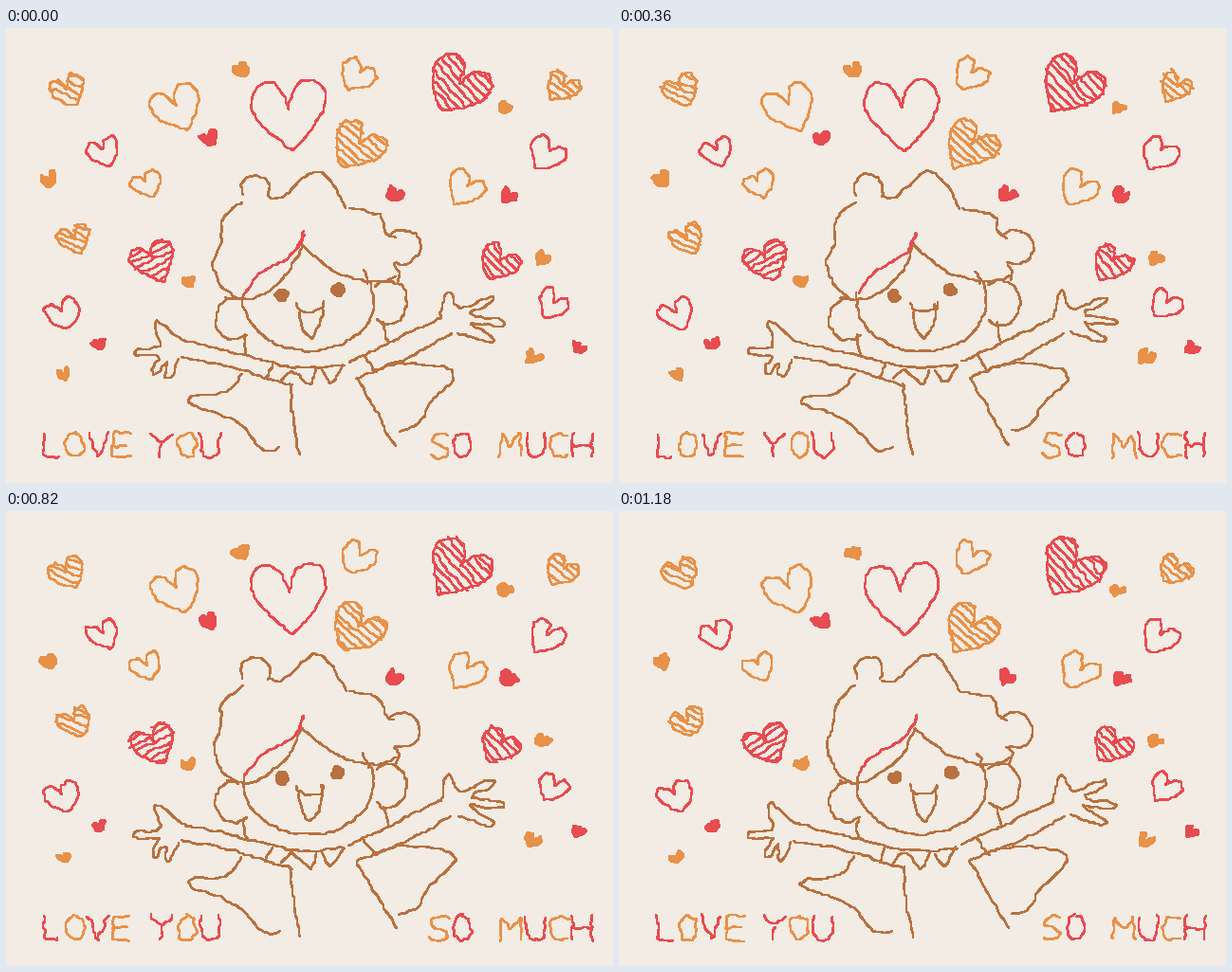
An HTML page for the animation above (1200 ms loop, 640 by 480 pixels).

```html
<!DOCTYPE html>
<html lang="en">
<head>
<meta charset="utf-8">
<title>Love you so much</title>
<style>
  html, body { margin: 0; width: 100%; height: 100%; overflow: hidden; background: #f3ece4; }
  svg { display: block; width: 640px; height: 480px; }
  path { fill: none; stroke-width: 2.9; stroke-linecap: round; stroke-linejoin: round; }
</style>
</head>
<body>
<svg id="art" viewBox="0 0 640 480" shape-rendering="crispEdges" role="img" aria-label="LOVE YOU SO MUCH"></svg>
<script>
const STEP = 20, LOOP = 1200;
const BROWN = '#b8713f', RED = '#e84b50', ORANGE = '#e89148';
const art = document.getElementById('art');
const strokes = [];

const parse = s => s.trim().split(/\s+/).map(p => p.split(',').map(Number));
const mix = (a, b, t) => [a[0] + (b[0] - a[0]) * t, a[1] + (b[1] - a[1]) * t];
const rad = deg => deg * Math.PI / 180;
const clamp = (v, lo, hi) => Math.max(lo, Math.min(hi, v));

function turn([x, y], deg) {
  const c = Math.cos(rad(deg)), s = Math.sin(rad(deg));
  return [x * c - y * s, x * s + y * c];
}

function random(seed) {
  return () => {
    seed = (seed + 0x6D2B79F5) | 0;
    let t = Math.imul(seed ^ (seed >>> 15), 1 | seed);
    t = (t + Math.imul(t ^ (t >>> 7), 61 | t)) ^ t;
    return ((t ^ (t >>> 14)) >>> 0) / 4294967296;
  };
}

// Catmull-Rom curve through the points, as a dense polyline
function smooth(pts, closed) {
  const n = pts.length, out = [];
  const at = i => closed ? pts[(i + n) % n] : pts[clamp(i, 0, n - 1)];
  for (let i = 0; i < (closed ? n : n - 1); i++) {
    const [a, b, c, d] = [at(i - 1), at(i), at(i + 1), at(i + 2)];
    for (let t = 0; t < 1; t += 0.125) {
      out.push([0, 1].map(j => b[j] + t / 2 * (c[j] - a[j] +
        t * (2 * a[j] - 5 * b[j] + 4 * c[j] - d[j] + t * (3 * b[j] - a[j] - 3 * c[j] + d[j])))));
    }
  }
  out.push(at(closed ? 0 : n - 1));
  return out;
}

function measure(pts) {
  const len = [0];
  for (let i = 1; i < pts.length; i++)
    len.push(len[i - 1] + Math.hypot(pts[i][0] - pts[i - 1][0], pts[i][1] - pts[i - 1][1]));
  return len;
}

function pointAt({ pts, len }, d) {
  let i = 1;
  while (i < len.length - 1 && len[i] < d) i++;
  return mix(pts[i - 1], pts[i], (d - len[i - 1]) / (len[i] - len[i - 1] || 1));
}

function add(pts, color, { step = 10, amp = 1.2, grain = 1.1, fill = false, closed = false } = {}) {
  const el = document.createElementNS('http://www.w3.org/2000/svg', 'path');
  el.style.stroke = color;
  if (fill) el.style.fill = color;
  art.appendChild(el);
  strokes.push({ el, pts, len: measure(pts), step, amp, grain, closed });
}

const line = (s, color = BROWN, opt) => add(smooth(parse(s)), color, opt);

function arc(x, y, rx, ry, from, to, opt) {
  const pts = Array.from({ length: 33 }, (_, i) => {
    const a = rad(from + (to - from) * i / 32);
    return [x + rx * Math.cos(a), y + ry * Math.sin(a)];
  });
  add(pts, BROWN, opt);
}

// Sample the stroke at uneven distances, then shake it finely
function rough(s, rnd) {
  const shake = (p, a) => p.map(v => v + (rnd() * 2 - 1) * a);
  const total = s.len[s.len.length - 1], knots = [];
  for (let d = s.closed ? rnd() * 3 : 0; d < total - s.step * 0.4; d += s.step * (0.7 + rnd() * 0.6))
    knots.push(shake(pointAt(s, d), s.amp));
  knots.push(s.closed ? knots[0] : shake(pointAt(s, total), s.amp));
  const out = [];
  knots.forEach((b, i) => {
    if (i) {
      const a = knots[i - 1];
      const n = Math.round(Math.hypot(b[0] - a[0], b[1] - a[1]) / 3.5);
      for (let k = 1; k < n; k++) out.push(shake(mix(a, b, k / n), s.grain));
    }
    out.push(b);
  });
  return 'M' + out.map(p => p.map(Math.round).join(' ')).join('L') + (s.closed ? 'Z' : '');
}

// Hearts lean outwards from the middle and fit a box around x, y
const HALF = parse('.06,-.3 .2,-.46 .42,-.42 .5,-.15 .35,.14 .12,.38');
function heartShape(x, y, w, h, notch) {
  const lean = clamp((x - 305) * 0.6, -24, 34);
  const mirror = HALF.map(([a, b]) => [-a, b]).reverse();
  const pts = smooth([[0, notch], [0, notch], ...HALF, [0, 0.5], [0, 0.5], ...mirror], true).map(p => turn(p, lean));
  const range = j => [Math.min(...pts.map(p => p[j])), Math.max(...pts.map(p => p[j]))];
  const [l, r] = range(0), [t, b] = range(1);
  return pts.map(p => [x + ((p[0] - l) / (r - l) - 0.5) * w, y + ((p[1] - t) / (b - t) - 0.5) * h]);
}

function hatch(shape, color, deg) {
  const pts = shape.map(p => turn(p, -deg));
  const ys = pts.map(p => p[1]), bottom = Math.max(...ys);
  for (let y = Math.min(...ys) + 5; y < bottom - 2; y += 7) {
    const xs = [];
    pts.forEach((b, i) => {
      const a = pts[(i || pts.length) - 1];
      if ((a[1] < y) !== (b[1] < y)) xs.push(mix(a, b, (y - a[1]) / (b[1] - a[1]))[0]);
    });
    xs.sort((a, b) => a - b);
    for (let i = 0; i + 1 < xs.length; i += 2)
      if (xs[i + 1] - xs[i] > 4)
        add([[xs[i], y], [xs[i + 1], y]].map(p => turn(p, deg)), color, { amp: 1.5 });
  }
}

// Each heart is x,y,size
function hearts(color, list, slant) {
  for (const [x, y, size] of parse(list)) {
    const shape = heartShape(x, y, size - 2, size * 0.98 - 2, -0.1);
    add(shape, color, { closed: true });
    if (slant !== undefined) hatch(shape, color, slant);
  }
}
function specks(color, list) {
  for (const [x, y, size] of parse(list))
    add(heartShape(x, y, size - 2, size * 0.9 - 2, 0.12), color, { closed: true, fill: true, step: 6, amp: 1.5 });
}

hearts(RED, '298,93,81 101,130,36 573,131,40 58,301,39 579,290,35');
hearts(ORANGE, '177,83,54 374,48,39 146,164,35 488,167,42');
hearts(RED, '482,58,65 523,246,42', 48);
hearts(RED, '153,245,48', -28);
hearts(ORANGE, '375,122,56 589,61,36', 40);
hearts(ORANGE, '63,65,39 70,222,37', 24);
specks(ORANGE, '246,44,20 44,159,21 192,267,17 60,365,17 527,83,17 567,242,18 557,346,20');
specks(RED, '213,116,21 98,333,18 411,175,20 531,176,20 605,337,17');

// Hair
line('246,287 228,273 218,248 227,228 228,203 249,184');
arc(263, 169, 16, 15, 145, 395);
line('277,178 291,179 322,152 340,158 359,190');
line('361,191 394,197 400,216 410,221');
arc(418, 231, 19, 19, -140, 115);
line('409,249 415,254 412,267');
line('376,256 382,261 381,270');
line('312,228 296,260 262,285 232,284');
line('312,229 345,256 386,268 412,261');
line('313,215 303,238 268,258 252,279', RED);
line('314,217 308,230', RED);

// Face
arc(319, 287, 69, 54, -20, 188);
arc(241, 307, 20, 22, 270, 50);
arc(403, 290, 20, 24, -130, 130);
line('252,323 250,333 255,346');
line('398,311 401,322 403,333');
line('307,289 310,298 333,297 335,288', BROWN, { step: 8 });
line('310,298 312,314 323,328 334,304 333,290', BROWN, { step: 8 });
for (const x of [291, 350])
  arc(x, 299 - x / 15.2 + (x < 320 ? 2 : 0), 7, 6.5, 0, 360, { closed: true, fill: true, step: 6, amp: 1 });

// Fingers fan out from the palm, with a valley between neighbours
function hand(palm, start, tips, end) {
  const pts = [start];
  tips.forEach((tip, i) => {
    if (i) pts.push(mix(palm, mix(tips[i - 1], tip, 0.5), 0.35));
    const len = Math.hypot(tip[0] - palm[0], tip[1] - palm[1]);
    const side = [(palm[1] - tip[1]) / len * 4, (tip[0] - palm[0]) / len * 4];
    const joint = mix(palm, tip, 0.85);
    const edge = k => [joint[0] + side[0] * k, joint[1] + side[1] * k];
    const way = start[1] < palm[1] && palm[0] < 320 ? 1 : -1;
    pts.push(edge(way), tip, edge(-way));
  });
  add(smooth([...pts, end]), BROWN, { step: 8 });
}
hand([172, 341], [187, 331], parse('158,308 134,342 154,365 171,370'), [182, 350]);
hand([470, 305], [458, 306], parse('466,277 516,285 527,311 515,332'), [476, 321]);

// Arms
line('186,330 235,341 305,358 357,355');
line('184,348 235,357 301,377');
line('361,352 402,333 458,306');
line('386,362 430,345 470,321');

// Clothes
line('281,355 274,370');
line('290,371 302,361 320,378 327,360', BROWN, { step: 8 });
line('333,361 343,375 356,355', BROWN, { step: 8 });
line('378,345 390,363');
line('249,365 240,378 225,387 196,388 194,397 240,414 270,444 289,442');
line('300,376 304,420 309,449');
line('370,369 416,354 474,364 446,397 433,420 414,425');
line('370,369 390,405 411,441');

// Hand-drawn capitals on a unit grid
const GLYPHS = {
  L: '.1,0 .1,1 .85,.95',
  O: '.5,0 .15,.1 0,.5 .15,.9 .5,1 .85,.9 1,.5 .85,.1 .5,0',
  V: '0,0 .5,1 1,0',
  E: '1,0 .05,0 .05,1 1,1|.05,.5 .85,.5',
  Y: '0,0 .5,.45 1,0|.5,.45 .45,1',
  U: '0,0 .05,.75 .3,1 .7,1 .95,.75 1,0',
  S: '1,.12 .6,0 .15,.08 .05,.35 .5,.5 .95,.65 .9,.92 .4,1 0,.88',
  M: '0,1 .1,0 .5,.6 .9,0 1,1',
  C: '1,.12 .6,0 .15,.15 0,.5 .15,.88 .6,1 1,.88',
  H: '0,0 0,1|1,0 1,1|0,.5 1,.5'
};
let count = 0;
function word(text, x) {
  for (const ch of text) {
    const w = 'MY'.includes(ch) ? 24 : 20;
    const color = count++ % 2 ? ORANGE : RED;
    for (const part of GLYPHS[ch].split('|'))
      add(parse(part).map(([a, b]) => [x + a * w, 427 + b * 26]), color, { step: 5, amp: 1.7, grain: 1.4 });
    x += w + 4.5;
  }
}
word('LOVE', 38);
word('YOU', 152);
word('SO', 447);
word('MUCH', 520);

let shown = -1;
function draw(ms) {
  const pose = Math.floor((ms % LOOP) / STEP);
  if (pose === shown) return;
  shown = pose;
  strokes.forEach((s, i) => s.el.setAttribute('d', rough(s, random(pose * 7919 + i * 104729 + 17))));
}
function tick() {
  draw(performance.now());
  requestAnimationFrame(tick);
}
tick();
</script>
</body>
</html>
```
